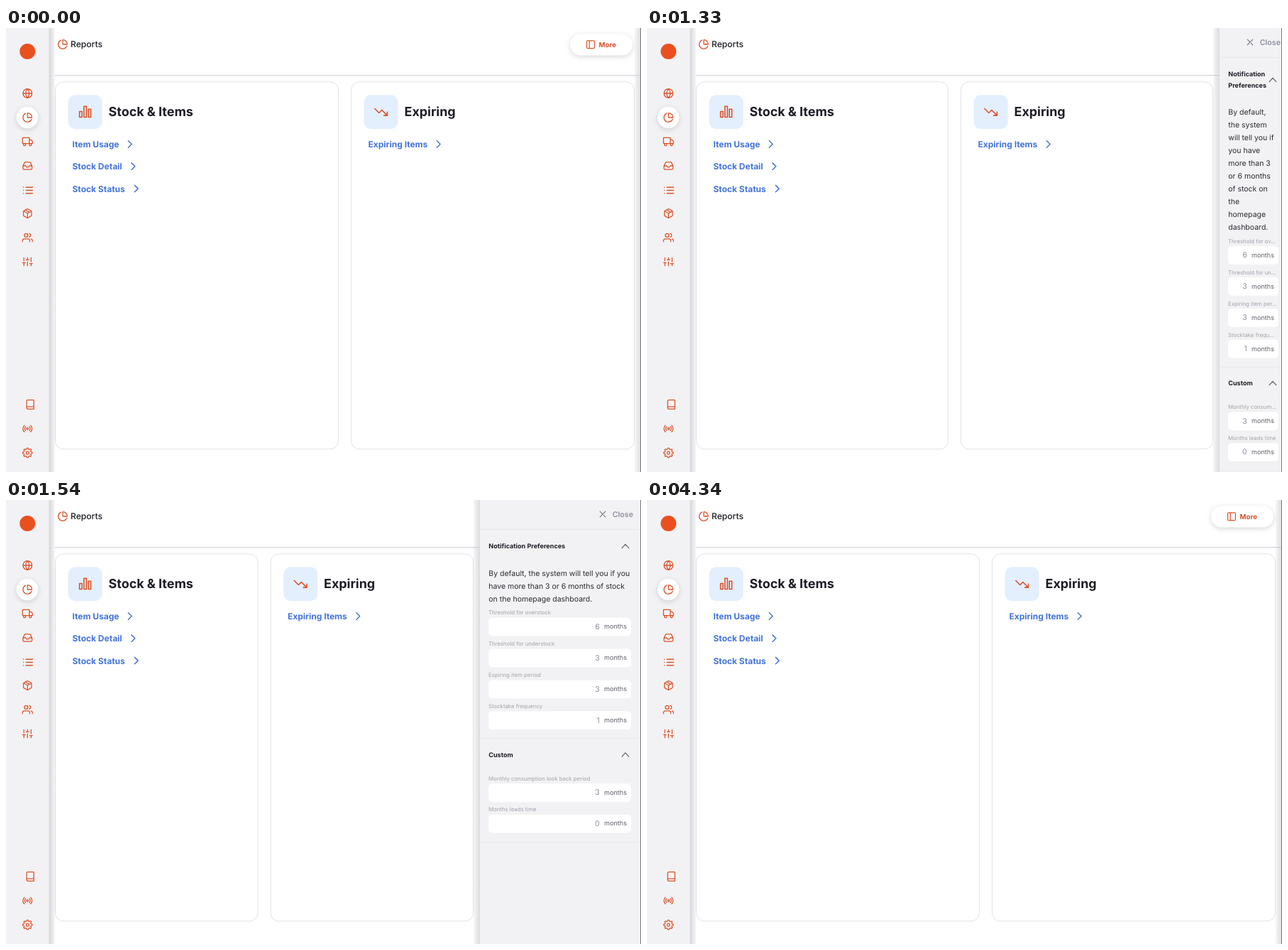
An HTML page that plays this animation: 895 px wide and 625 px high, repeating every 5530 ms.

```html
<!DOCTYPE html>
<html lang="en">
<head>
<meta charset="utf-8">
<title>Reports</title>
<style>
  html, body { margin: 0; width: 100%; height: 100%; overflow: hidden; background: #fff; }
  svg { display: block; width: 100%; height: 100%; font-family: Inter, sans-serif; font-optical-sizing: none; text-rendering: geometricPrecision; }
  .icon { fill: none; stroke: #dc5229; stroke-width: 2; stroke-linecap: round; stroke-linejoin: round; }
  .line { fill: none; stroke-linecap: round; stroke-linejoin: round; }
  .lifted { filter: drop-shadow(0 2.5px 3.5px rgba(60, 61, 80, .2)); }
</style>
</head>
<body>
<svg id="stage" viewBox="0 0 895 625" xmlns="http://www.w3.org/2000/svg"></svg>
<script>
const LOOP = 5530, STEP = 70;
const STAGE_W = 895, STAGE_H = 625, PANEL_W = 227, PANEL_MIN = 97;
const OPEN = { start: 1221, length: 252 }, SHUT = { start: 4087, length: 199 };
const INK = '#1c1c24', BLUE = '#4374db', GREY = '#8f90a0', SURFACE = '#f2f2f4';

const gear = 'M' + Array.from({ length: 96 }, (_, i) => {
  const a = i * Math.PI / 48, r = 9.3 + 1.5 * Math.tanh(1.6 * Math.cos(8 * a));
  return `${(12 + r * Math.cos(a)).toFixed(2)} ${(12 + r * Math.sin(a)).toFixed(2)}`;
}).join('L') + 'Z';

const disc = (x, y, r) => `M${x - r} ${y}a${r} ${r} 0 1 0 ${2 * r} 0a${r} ${r} 0 1 0 ${-2 * r} 0`;

// Icon outlines on a 24 x 24 grid.
const ICONS = {
  globe: disc(12, 12, 10) + 'M2 12h20M12 2a15.3 15.3 0 0 1 4 10 15.3 15.3 0 0 1-4 10 15.3 15.3 0 0 1-4-10 15.3 15.3 0 0 1 4-10z',
  pie: 'M21.21 15.89A10 10 0 1 1 8 2.83M22 12A10 10 0 0 0 12 2v10z',
  truck: 'M1 3h15v13H1zM16 8h4l3 3v5h-7z' + disc(5.5, 18.5, 2.5) + disc(18.5, 18.5, 2.5),
  inbox: 'M22 12h-6l-2 3h-4l-2-3H2M5.45 5.11L2 12v6a2 2 0 0 0 2 2h16a2 2 0 0 0 2-2v-6l-3.45-6.89A2 2 0 0 0 16.76 4H7.24a2 2 0 0 0-1.79 1.11z',
  list: 'M8 6h13M8 12h13M8 18h13M3 6h.01M3 12h.01M3 18h.01',
  box: 'M16.5 9.4l-9-5.19M21 16V8a2 2 0 0 0-1-1.73l-7-4a2 2 0 0 0-2 0l-7 4A2 2 0 0 0 3 8v8a2 2 0 0 0 1 1.73l7 4a2 2 0 0 0 2 0l7-4A2 2 0 0 0 21 16zM3.27 6.96L12 12.01l8.73-5.05M12 22.08V12',
  users: 'M17 21v-2a4 4 0 0 0-4-4H5a4 4 0 0 0-4 4v2M23 21v-2a4 4 0 0 0-3-3.87M16 3.13a4 4 0 0 1 0 7.75' + disc(9, 7, 4),
  sliders: 'M4 21v-7M4 10V3M12 21v-9M12 8V3M20 21v-5M20 12V3M1 14h6M9 8h6M17 16h6',
  book: 'M4 19.5A2.5 2.5 0 0 1 6.5 17H20M6.5 2H20v20H6.5A2.5 2.5 0 0 1 4 19.5v-15A2.5 2.5 0 0 1 6.5 2z',
  radio: disc(12, 12, 2) + 'M16.24 7.76a6 6 0 0 1 0 8.49M7.76 16.24a6 6 0 0 1 0-8.49M19.07 4.93a10 10 0 0 1 0 14.14M4.93 19.07a10 10 0 0 1 0-14.14',
  gear: gear + disc(12, 12, 3),
  bars: 'M2 11h4.4v10H2zM9.8 2h4.4v19H9.8zM17.6 7H22v14h-4.4z',
  falling: 'M23 18l-9.5-9.5-5 5L1 6M17 18h6v-6',
  columns: 'M5 3h14a2 2 0 0 1 2 2v14a2 2 0 0 1-2 2H5a2 2 0 0 1-2-2V5a2 2 0 0 1 2-2zM9 3v18',
};

const MENU = [
  ['globe', 30.3, 92], ['pie', 30.3, 126], ['truck', 30.3, 160], ['inbox', 30.3, 194],
  ['list', 31, 228.5, .72], ['box', 30.3, 261], ['users', 30.3, 295], ['sliders', 30.3, 329],
  ['book', 34.2, 530], ['radio', 30.3, 564], ['gear', 30.3, 598],
];

const NOTE = 'By default, the system will tell you if you have more than 3 or 6 months of stock on the homepage dashboard.'.split(' ');

// Each field: offset, label (cut at the bar in a narrow panel), value.
const FIELDS = [
  [0, 'Threshold for ov|erstock', 6],
  [43.9, 'Threshold for un|derstock', 3],
  [87.9, 'Expiring item per|iod', 3],
  [131.8, 'Stocktake frequ|ency', 1],
  [233.5, 'Monthly consum|ption look back period', 3],
  [277.2, 'Months leads time', 0],
];

const text = (x, y, size, weight, fill, words, anchor = 'start') =>
  `<text x="${x}" y="${y}" font-size="${size}" font-weight="${weight}" fill="${fill}" text-anchor="${anchor}">${words}</text>`;

const rect = (x, y, w, h, fill, r = 0, extra = '') =>
  `<rect x="${x}" y="${y}" width="${w}" height="${h}" rx="${r}" fill="${fill}" ${extra}/>`;

const icon = (name, x, y, scale = .635) =>
  `<path class="icon" transform="translate(${x} ${y}) scale(${scale}) translate(-12 -12)" d="${ICONS[name]}"/>`;

const line = (d, stroke, width) =>
  `<path class="line" d="${d}" stroke="${stroke}" stroke-width="${width}"/>`;

// cubic-bezier(.4, 0, .6, 1)
function sharp(x) {
  if (x <= 0) return 0;
  if (x >= 1) return 1;
  let low = 0, high = 1, s;
  for (let i = 0; i < 30; i++) {
    s = (low + high) / 2;
    const at = 1.2 * s * (1 - s) ** 2 + 1.8 * s * s * (1 - s) + s ** 3;
    if (at < x) low = s; else high = s;
  }
  return s * s * (3 - 2 * s);
}

const progress = (time, { start, length }) => sharp((time - start) / length);

function noteLines(width) {
  const counts = width < 140 ? [2, 2, 4, 2, 3, 3, 3, 1, 1, 1]
    : width < 195 ? [6, 8, 6, 2]
    : width < 216 ? [8, 8, 5, 1] : [9, 9, 4];
  let from = 0;
  return counts.map(n => NOTE.slice(from, from += n).join(' '));
}

function sidebar() {
  return rect(0, 0, 60.5, STAGE_H, SURFACE)
    + rect(60.5, 0, 8.5, STAGE_H, 'url(#leftShade)')
    + '<circle cx="30.3" cy="33" r="11" fill="#e9501f"/>'
    + '<circle class="lifted" cx="30" cy="126" r="15.2" fill="#fff"/>'
    + MENU.map(item => icon(...item)).join('');
}

function card(x, width, iconName, title, links) {
  const rows = links.map(([label, chevron], i) => {
    const y = 163.5 + 31.3 * i;
    return text(x + 24.5, y + 4.5, 12, 700, BLUE, label)
      + line(`M${x + chevron} ${y - 4.7}l4.8 4.7l-4.8 4.7`, BLUE, 1.5);
  }).join('');
  return rect(x + .5, 75.8, width - 1, 517, '#fff', 11.5, 'stroke="#e3e3e9"')
    + rect(x + 18.6, 94.2, 48, 48, '#e3effd', 10)
    + icon(iconName, x + 42.6, 118.3, .8)
    + text(x + 75.6, 124.3, 17.9, 700, INK, title) + rows;
}

function page(edge, showMore) {
  const width = (edge - 95) / 2;
  const more = rect(edge - 100, 8.2, 88, 30.4, '#fff', 15.2, 'class="lifted"')
    + icon('columns', edge - 71, 23.3, .6)
    + text(edge - 59.5, 27, 9.7, 700, '#d5522c', 'More');
  return rect(edge - 9, 0, 9, STAGE_H, 'url(#rightShade)')
    + rect(60.5, 66.3, edge - 60.5, 1, '#c8c9d2')
    + icon('pie', 80, 23) + text(91, 27.2, 12.1, 500, INK, 'Reports')
    + (showMore ? more : '')
    + card(69, width, 'bars', 'Stock &amp; Items', [['Item Usage', 103.3], ['Stock Detail', 108], ['Stock Status', 112.3]])
    + card(86 + width, width, 'falling', 'Expiring', [['Expiring Items', 121.3]]);
}

function panel(edge, width, press) {
  if (width <= 0) return '';
  const narrow = width < 140;
  const left = edge + 12.3, right = edge + Math.max(width, PANEL_MIN);
  const lines = noteLines(width);
  const noteY = narrow ? 122.2 : 106.9;
  const top = 104.5 + 18 * lines.length + (narrow ? 15.5 : 0);

  const divider = y => rect(edge, y, STAGE_W - edge, 1, '#e8e8ec');
  const chevron = y => line(`M${right - 26.8} ${y + 2.6}l4.8 -5.2l4.8 5.2`, '#62626c', 1.3);
  const heading = (y, words) => text(left, y + 3.4, 9.05, 700, INK, words);
  const ripple = `<circle cx="${right - 21}" cy="20" r="${14 * press}" fill="#e3e3e8"/>`;
  const field = ([offset, label, value]) => {
    const y = top + offset, [start, rest = ''] = label.split('|');
    return text(left - .3, y + 2.7, 7.8, 400, '#a3a3ab', start + (narrow && rest ? '...' : rest))
      + rect(left - .3, y + 7.2, right - left - 13.7, 25.6, '#fff', 5)
      + text(right - 58.2, y + 23.2, 10.6, 400, GREY, value, 'end')
      + text(right - 20, y + 22.7, 9.1, 400, '#5c5c68', 'months', 'end');
  };

  return rect(edge, 0, width, STAGE_H, SURFACE) + ripple
    + line(`M${right - 57.8} 16.2l7.6 7.6m0 -7.6l-7.6 7.6`, '#777781', 1.2)
    + text(right - 40.3, 24.1, 10.7, 600, GREY, 'Close')
    + divider(41)
    + (narrow ? heading(64.5, 'Notification') + heading(80.2, 'Preferences') : heading(64.5, 'Notification Preferences'))
    + chevron(narrow ? 73 : 65)
    + lines.map((words, i) => text(left, noteY + 18 * i, 10.5, 400, '#2b2b33', words)).join('')
    + FIELDS.map(field).join('')
    + divider(top + 176.7) + heading(top + 200, 'Custom') + chevron(top + 200)
    + divider(top + 322.7);
}

const shade = (id, from, to) =>
  `<linearGradient id="${id}"><stop stop-color="${from}"/><stop offset="1" stop-color="${to}"/></linearGradient>`;

function scene(time) {
  const closing = progress(time, SHUT);
  const width = Math.round(PANEL_W * (progress(time, OPEN) - closing));
  const edge = STAGE_W - width;
  const showMore = time < OPEN.start || time > SHUT.start;
  return `<defs>${shade('leftShade', '#d6d6da', '#f7f7f8')}${shade('rightShade', '#f7f7f8', '#dcdce0')}</defs>`
    + rect(0, 0, STAGE_W, STAGE_H, '#fff')
    + page(edge, showMore) + sidebar() + panel(edge, width, closing)
    + rect(894, 0, 1, STAGE_H, '#77777c');
}

const stage = document.getElementById('stage');
let shown = -1;

function tick() {
  const time = Math.floor(performance.now() % LOOP / STEP) * STEP;
  if (time !== shown) stage.innerHTML = scene(shown = time);
  requestAnimationFrame(tick);
}
tick();
</script>
</body>
</html>
```
